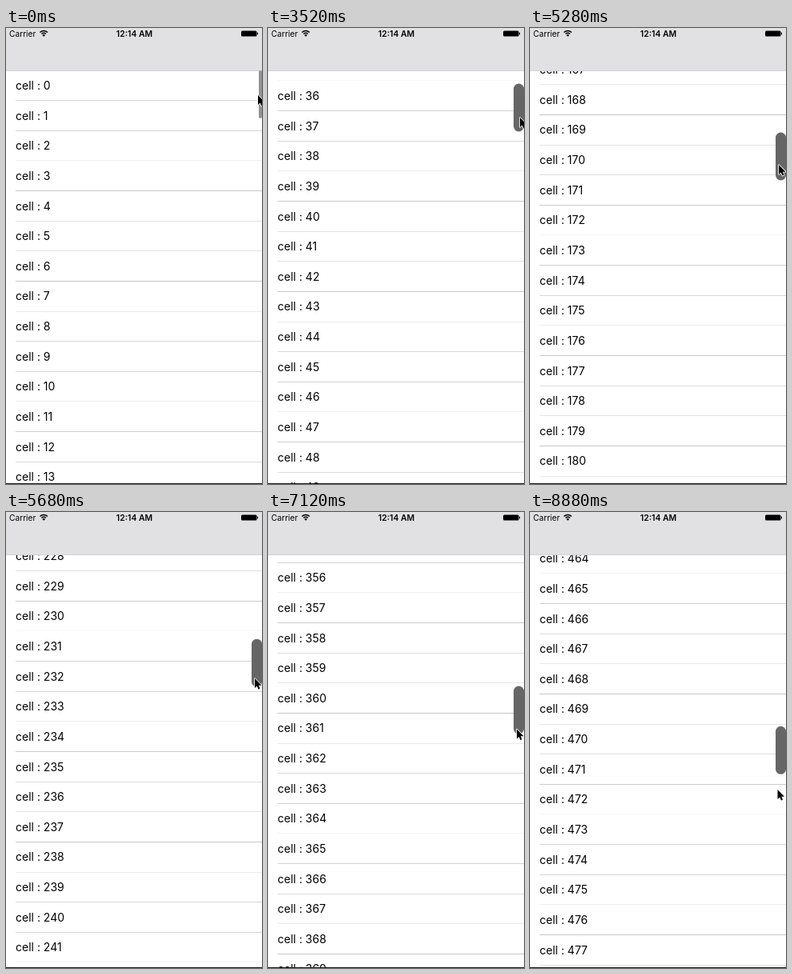
These frames come from a looping animation (320x570 px, 8920 ms). An HTML page with a canvas:

```html
<!DOCTYPE html>
<html lang="en">
<head>
<meta charset="utf-8">
<title>Fast scroll list</title>
<style>
  html, body { margin: 0; width: 100%; height: 100%; overflow: hidden; background: #fff; }
  canvas { display: block; width: 320px; height: 570px; }
</style>
</head>
<body>
<canvas id="stage" width="320" height="570"></canvas>
<script>
const ctx = document.getElementById('stage').getContext('2d');
const WIDTH = 320, HEIGHT = 570, TOP = 53, ROW = 37.63;
const LOOP = 8920, STEP = 40;
const PIXELS_PER_THUMB = 81.35;

// time, list offset, pointer x, pointer y
const KEYS = [
  [0, 0, 315, 84],
  [3200, 0, 315, 84],
  [3280, 130, 315, 92],
  [3520, 1341.7, 315, 112],
  [4440, 6304, 311, 170],
  [5240, 6304, 311, 170],
  [5280, 6304, 311, 171],
  [5380, 6500, 311, 180],
  [6160, 11951, 311, 253],
  [6240, 12250, 311, 257],
  [6640, 12250, 311, 257],
  [7120, 13386, 311, 271.5],
  [7440, 14500, 311, 287],
  [8400, 14500, 311, 287],
  [8880, 17474, 309.5, 347],
  [LOOP, 17474, 309.5, 347]
];

function poseAt(time) {
  const next = KEYS.findIndex(key => key[0] > time);
  const from = KEYS[next - 1], to = KEYS[next];
  const part = (time - from[0]) / (to[0] - from[0]);
  return from.slice(1).map((value, i) => value + (to[i + 1] - value) * part);
}

function rect(color, x, y, w, h) {
  ctx.fillStyle = color;
  ctx.fillRect(x, y, w, h);
}

function pill(color, x, y, w, h, radius) {
  ctx.fillStyle = color;
  ctx.beginPath();
  ctx.roundRect(x, y, w, h, radius);
  ctx.fill();
}

function text(content, x, y, font, align = 'left') {
  ctx.fillStyle = '#000';
  ctx.font = `${font} Inter, Roboto, sans-serif`;
  ctx.textAlign = align;
  ctx.fillText(content, x, y);
}

function drawRows(offset) {
  const first = Math.floor(offset / ROW);
  for (let i = first; i <= first + 14; i++) {
    const y = TOP + i * ROW - offset;
    text(`cell : ${i}`, 12, y + 24, '14px');
    // Thin separators fade as they cross pixel boundaries.
    const line = y + ROW, fraction = line - Math.floor(line);
    ctx.globalAlpha = Math.max(0.15, 1 - 1.6 * Math.abs(fraction - 0.45));
    rect('#c4c4c6', 12, Math.floor(line), WIDTH - 12, 1);
    ctx.globalAlpha = 1;
  }
}

function drawHeader() {
  rect('#e1e0e3', 0, 0, WIDTH, TOP);
  rect('#d2d1d4', 0, TOP, WIDTH, 1);
  text('Carrier', 4, 11, '10.2px');
  text('12:14 AM', 160.5, 11, '600 10.4px', 'center');

  ctx.strokeStyle = '#000';
  ctx.lineWidth = 1.4;
  for (const radius of [4, 6.7]) {
    ctx.beginPath();
    ctx.arc(47.2, 10.2, radius, -Math.PI * 0.75, -Math.PI * 0.25);
    ctx.stroke();
  }
  ctx.fillStyle = '#000';
  ctx.beginPath();
  ctx.moveTo(47.2, 10.8);
  ctx.arc(47.2, 10.8, 2.6, -Math.PI * 0.75, -Math.PI * 0.25);
  ctx.fill();

  pill('#000', 294, 3.5, 19.5, 7, 1.5);
  rect('#000', 314, 5.7, 1, 2.6);
}

function drawThumb(time, offset) {
  const grow = 1 - (1 - Math.min(time / 320, 1)) ** 2;
  const width = 4 + 9 * grow;
  const shade = Math.round(146 - 44 * grow);
  pill(`rgb(${shade},${shade},${shade})`, WIDTH - width, TOP + offset / PIXELS_PER_THUMB,
    width, 60, width / 2);
}

function drawPointer(x, y) {
  const arrow = new Path2D('M0 0V12L2.7 9.5L4.5 13.6L6.5 12.7L4.8 8.7H8.5Z');
  ctx.save();
  ctx.translate(x, y);
  ctx.strokeStyle = '#fff';
  ctx.lineWidth = 1.6;
  ctx.lineJoin = 'round';
  ctx.stroke(arrow);
  ctx.fillStyle = '#000';
  ctx.fill(arrow);
  ctx.restore();
}

function draw(time) {
  const [offset, x, y] = poseAt(time);
  rect('#fff', 0, 0, WIDTH, HEIGHT);
  drawRows(offset);
  drawHeader();
  drawThumb(time, offset);
  drawPointer(x, y);
  rect('#1c1c1c', 0, HEIGHT - 1, WIDTH, 1);
}

const start = performance.now();
function tick() {
  const time = (performance.now() - start) % LOOP;
  draw(Math.floor(time / STEP) * STEP);
  requestAnimationFrame(tick);
}
tick();
</script>
</body>
</html>
```
